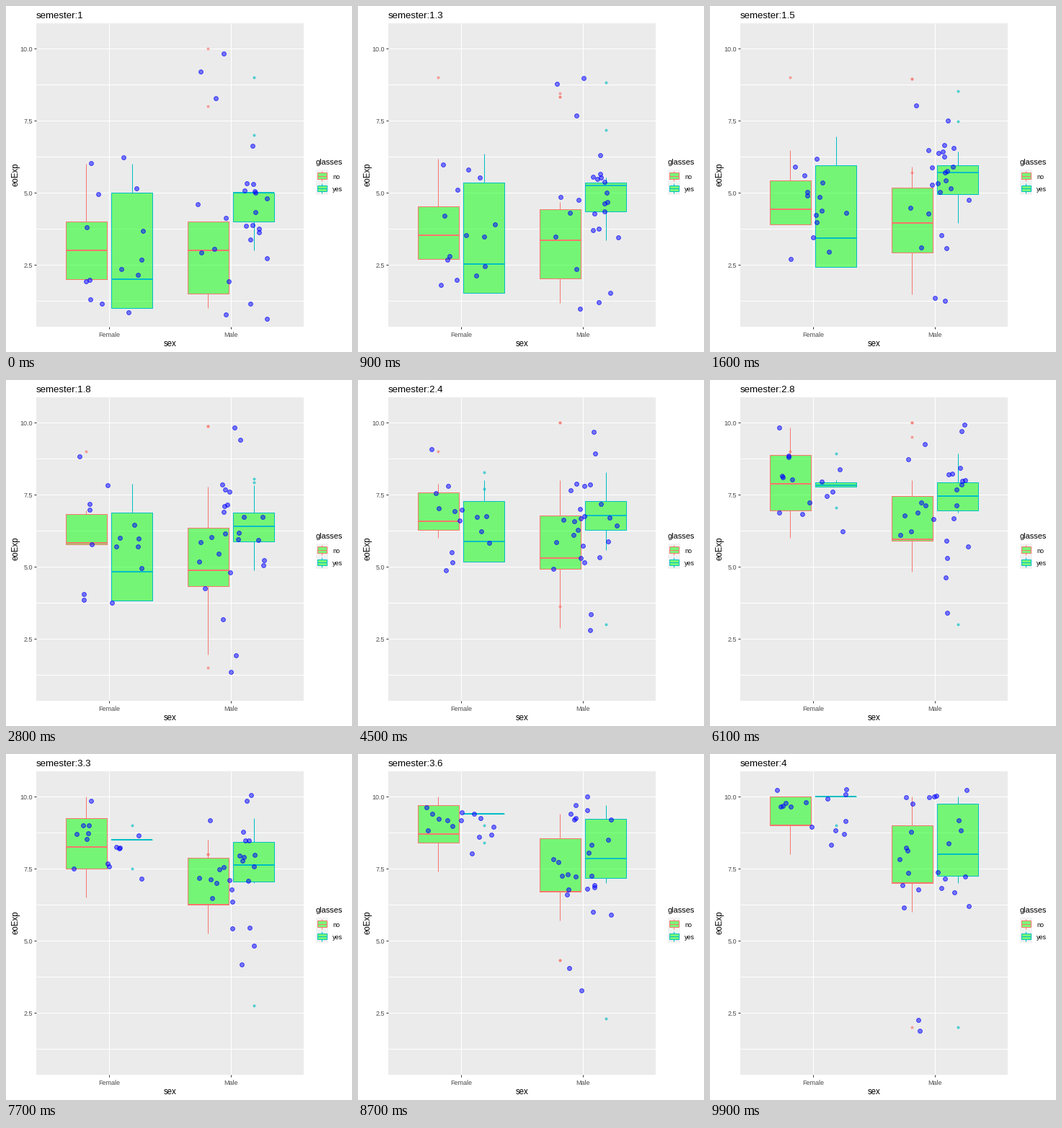
A matplotlib script that plays this animation: 480 px wide and 480 px high, repeating every 10000 ms.

```python
import numpy as np
import matplotlib.pyplot as plt
from matplotlib.animation import FuncAnimation
from matplotlib.colors import to_rgba
from matplotlib.patches import Rectangle

plt.rcParams["font.family"] = "Liberation Sans"

SIZE, FRAMES, STEP = 480, 100, 33
LEFT, RIGHT, TOP, BOTTOM = 41.7, 413.4, 23.6, 444.6
UNIT = (RIGHT - LEFT) / 2.2
FEMALE, MALE = LEFT + 0.6 * UNIT, LEFT + 1.6 * UNIT
DODGE, BOX_W = 0.1875 * UNIT, 0.3375 * UNIT
RED, TEAL, GREEN = "#F8766D", "#00BFC4", (0, 1, 0, 0.5)

rng = np.random.default_rng(12)


def ypix(v):
    return 458.9 - 39.95 * np.asarray(v, float)


def tween(a, b, e):
    return np.asarray(a, float) * (1 - e) + np.asarray(b, float) * e


def tween_outliers(a, b, e):
    """Recycle the shorter list; an empty one collapses to the other's mean."""
    if e == 0 or not (a or b):
        return np.array(a, float)
    a, b = a or [np.mean(b)], b or [np.mean(a)]
    n = max(len(a), len(b))
    return tween(np.resize(a, n), np.resize(b, n), e)


def jittered(center, n, stats, outliers):
    """Whole scores spread along the box's quantiles, jittered like geom_jitter."""
    rank = np.linspace(0, 4, n - len(outliers))
    scores = np.append(np.round(np.interp(rank, range(5), stats)), outliers)
    x = center + rng.uniform(-0.3, 0.3, n) * UNIT
    y = ypix(rng.permutation(scores) + rng.uniform(-0.4, 0.4, n))
    return np.column_stack([x, y])


fig = plt.figure(figsize=(SIZE / 72, SIZE / 72), dpi=72, facecolor="white")
ax = fig.add_axes([0, 0, 1, 1])
ax.set_xlim(0, SIZE)
ax.set_ylim(SIZE, 0)
ax.axis("off")


def line(xs, ys, color, lw=1, z=2):
    return ax.plot(xs, ys, color=color, lw=lw, zorder=z, solid_capstyle="butt")[0]


def rect(x, y, w, h, z=2, **style):
    return ax.add_patch(Rectangle((x, y), w, h, zorder=z, **style))


def label(x, y, s, size=11, color="black", **kw):
    return ax.text(x, y, s, fontsize=size, color=color, **kw)


def dots(radius, color, z):
    return ax.scatter([], [], s=(2 * radius) ** 2, facecolors=[to_rgba(color, 0.5)],
                      edgecolors=[to_rgba(color, 0.68)], linewidths=1, zorder=z)


class Group:
    """One box with its outliers and its students, keyed by semester."""

    def __init__(self, center, side, color, n, stats, outliers):
        self.x = x = center + side * DODGE
        self.stats, self.outliers = stats, outliers
        self.points = [jittered(center, n, s, o) for s, o in zip(stats, outliers)]
        self.out = dots(1.45, color, 2)
        self.low = line([x, x], [0, 0], color)
        self.high = line([x, x], [0, 0], color)
        self.body = rect(x - BOX_W / 2, 0, BOX_W, 0, fc=GREEN, ec=color, lw=1)
        self.mid = line([x - BOX_W / 2, x + BOX_W / 2], [0, 0], color, 2)
        self.students = dots(2.9, "blue", 4)

    def update(self, k, n, e):
        lo, q1, med, q3, hi = ypix(tween(self.stats[k], self.stats[n], e))
        self.low.set_ydata([lo, q1])
        self.high.set_ydata([q3, hi])
        self.body.set_y(q3)
        self.body.set_height(q1 - q3)
        self.mid.set_ydata([med, med])
        ys = ypix(tween_outliers(self.outliers[k], self.outliers[n], e))
        self.out.set_offsets(np.column_stack([np.full(len(ys), self.x), ys]))
        self.students.set_offsets(tween(self.points[k], self.points[n], e))


def legend_key(y, color, text):
    x, w = 438.3, 17.28
    rect(x - w / 2, y - w / 2, w, w, fc="#F2F2F2", ec="none")
    for side in (-1, 1):
        line([x, x], [y + side * 0.25 * w, y + side * 0.4 * w], color)
    rect(x - 0.375 * w, y - 0.25 * w, 0.75 * w, 0.5 * w, fc=GREEN, ec=color, lw=1)
    line([x - 0.375 * w, x + 0.375 * w], [y, y], color)
    label(453, y + 4.5, text, 9)


# Panel, grid and axes
rect(LEFT, TOP, RIGHT - LEFT, BOTTOM - TOP, z=0, fc="#EBEBEB", ec="none")
for v in np.arange(1.25, 10.1, 1.25):
    y = ypix(v)
    line([LEFT, RIGHT], [y, y], "white", z=1)
    if v % 2.5 == 0:
        line([LEFT - 3, LEFT], [y, y], "#333333")
        label(37, y + 3.5, f"{v:.1f}", 9, "#4D4D4D", ha="right")
for x, name in ((FEMALE, "Female"), (MALE, "Male")):
    line([x, x], [TOP, BOTTOM], "white", z=1)
    line([x, x], [BOTTOM, BOTTOM + 3], "#333333")
    label(x, 459, name, 9, "#4D4D4D", ha="center")
label(227.5, 472.5, "sex", 11.5, ha="center")
label(13.5, 234, "eoExp", 11.5, rotation=90, ha="center", va="center")
title = label(41.7, 17, "", 13.2)

label(430, 220.5, "glasses")
legend_key(235.6, RED, "no")
legend_key(252.9, TEAL, "yes")

# Whisker, quartile and median values, then outliers, at semesters 1 to 4
groups = [
    Group(FEMALE, -1, RED, 7,
          [(2, 2, 3, 4, 6), (6, 6, 6, 7, 7), (6, 7, 8, 9, 10), (8, 9, 9, 10, 10)],
          [[], [9], [], []]),
    Group(FEMALE, 1, TEAL, 7,
          [(1, 1, 2, 5, 6), (4, 4, 5, 7, 8), (8,) * 5, (10,) * 5],
          [[], [], [9, 7], [9]]),
    Group(MALE, -1, RED, 12,
          [(1, 1.5, 3, 4, 4), (2, 4.5, 5, 6.5, 8), (5, 6, 6, 7.5, 8), (6, 7, 7, 9, 10)],
          [[8, 10], [10, 1, 10], [10, 10], [2]]),
    Group(MALE, 1, TEAL, 13,
          [(3, 4, 5, 5, 5), (5, 6, 6.5, 7, 8), (7, 7, 7.5, 8, 9), (7, 7.25, 8, 9.75, 10)],
          [[9, 7], [], [3], [2]]),
]


def update(i):
    k, step = divmod(i, STEP)
    e = (1 - np.cos(np.pi * step / STEP)) / 2
    title.set_text(f"semester:{1 + i / STEP:.2g}")
    for group in groups:
        group.update(k, min(k + 1, 3), e)
    return []


anim = FuncAnimation(fig, update, frames=FRAMES, interval=100, repeat=True, repeat_delay=0)
plt.show()
```
